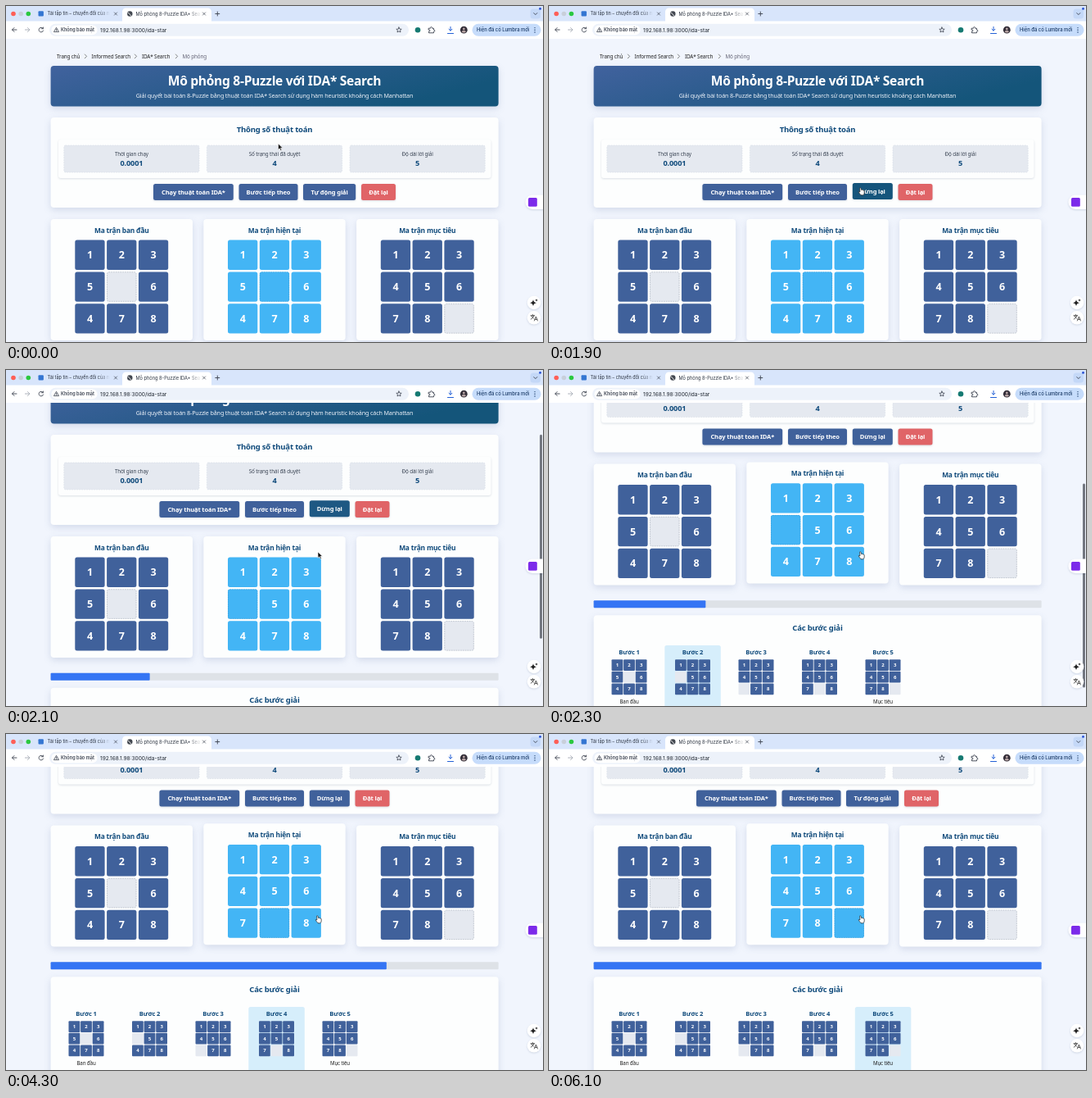
Recreate the animation shown at these times as an HTML page. Size 656 by 410 pixels, loop 6.3 s.

```html
<!DOCTYPE html>
<html lang="vi">
<head>
<meta charset="utf-8">
<title>8-Puzzle IDA*</title>
<style>
  html, body { margin: 0; width: 100%; height: 100%; overflow: hidden; background: #f1f5fd; }
  svg { display: block; width: 100vw; height: 100vh; }
  text { font-family: "Noto Sans", "Open Sans", sans-serif; letter-spacing: -.02em; white-space: pre; }
  .ui text { font-family: Inter, Roboto, sans-serif; letter-spacing: 0; }
  .card { filter: drop-shadow(0 3px 4.5px rgb(40 70 130 / .15)); }
  .soft { filter: drop-shadow(0 1px 1px rgb(40 60 100 / .16)); }
  .line { fill: none; stroke-linecap: round; stroke-linejoin: round; }
</style>
</head>
<body>
<svg id="stage" viewBox="0 0 656 410" preserveAspectRatio="none"></svg>
<script>
const LOOP = 6300, FRAME = 100;
const NAVY = '#40619b', DARK = '#15557c', SKY = '#43b5f5', HEAD = '#0f4a7b', PALE = '#e5e9f0';
const MOVES = [1920, 2930, 3930, 4930];
const START = 900, FINISH = 6000;
const BOARDS = ['1235 6478', '123 56478', '123456 78', '1234567 8', '12345678 '];
const SCROLL = [[1900, 0], [2000, 14], [2100, 57], [2200, 113], [2300, 145.5],
                [2400, 147.6], [2500, 148.2], [2700, 148.5]];

// Markup helpers; text is centred vertically on y.
const rect = (x, y, w, h, fill, r = 0, extra = '') =>
  `<rect x="${x}" y="${y}" width="${w}" height="${h}" rx="${r}" fill="${fill}" ${extra}/>`;
const circle = (x, y, r, fill, extra = '') =>
  `<circle cx="${x}" cy="${y}" r="${r}" fill="${fill}" ${extra}/>`;
const line = (d, color, width = .9, extra = '') =>
  `<path class="line" d="${d}" stroke="${color}" stroke-width="${width}" ${extra}/>`;
const text = (x, y, s, size, fill, weight = 400, anchor = 'middle') =>
  `<text x="${x}" y="${y}" dy=".36em" font-size="${size}" fill="${fill}" font-weight="${weight}" text-anchor="${anchor}">${s}</text>`;
const left = (x, y, s, size, fill, weight) => text(x, y, s, size, fill, weight, 'start');
const card = (x, y, w, h) => rect(x, y, w, h, '#fdfefe', 4, 'class="card"');

function dashed(x, y, size, color) {
  return rect(x + .4, y + .4, size - .8, size - .8, 'none', 2,
    `stroke="${color}" stroke-width=".8" stroke-dasharray="1.6 1.2"`);
}

function grid(x0, y0, board, tile, pitch, size, radius) {
  return [...board].map((n, i) => {
    const x = x0 + i % 3 * pitch, y = y0 + Math.floor(i / 3) * pitch;
    const box = rect(x, y, tile, tile, n === ' ' ? PALE : NAVY, radius);
    if (n !== ' ') return box + text(x + tile / 2, y + tile / 2, n, size, '#fff', 700);
    return box + (tile > 20 ? dashed(x, y, tile, '#b9bfc8') : '');
  }).join('');
}

function currentGrid(x0, y0) {
  return Array.from({ length: 9 }, (_, i) => {
    const x = x0 + i % 3 * 38.8, y = y0 + Math.floor(i / 3) * 38.8;
    return rect(x, y, 36.3, 36.3, SKY, 2.5) +
      `<g class="gap">${dashed(x, y, 36.3, '#3594cf')}</g>` +
      `<g class="digit">${text(x + 18.15, y + 18.15, '', 12.5, '#fff', 700)}</g>`;
  }).join('');
}

function matrix(cx, title, content) {
  return card(cx - 86.7, 260, 173.4, 148) + text(cx, 273.8, title, 8.4, HEAD, 700) + content;
}

function pageMarkup() {
  const chevrons = [97.5, 158.5, 208.5].map(x => line(`M${x - 1.2} 59l2.3 2.4l-2.3 2.4`, '#555', .7));
  const stats = [['Thời gian chạy', '0.0001'], ['Số trạng thái đã duyệt', '4'], ['Độ dài lời giải', '5']]
    .map(([label, value], i) => {
      const x = 70.8 + i * 174.6;
      return rect(x, 170, 165.2, 33, PALE, 2) +
        rect(x, 170, 165.2, 33, 'none', 2, 'stroke="#d3dae4" stroke-width=".6" stroke-dasharray="1.5 1.5"') +
        text(x + 82.6, 181, label, 6.3, '#3c4655') + text(x + 82.6, 192, value, 9.2, HEAD, 700);
    });
  const buttons = ['Chạy thuật toán IDA*', 'Bước tiếp theo', '', 'Đặt lại'].map((label, i) =>
    `<g class="button">${rect(0, 217, 10, 20, i === 3 ? '#e06467' : NAVY, 2.5, 'class="soft"')}${text(0, 227, label, 7.55, '#fff', 700)}</g>`);
  const steps = BOARDS.map((board, i) => {
    const cx = 98 + i * 77.5, note = { 0: 'Ban đầu', 4: 'Mục tiêu' }[i] || '';
    return rect(cx - 34.2, 481.5, 68.5, 80, '#d6eefb', 2.5, 'class="step"') +
      text(cx, 490, `Bước ${i + 1}`, 7.6, HEAD, 700) +
      grid(cx - 21.5, 498.7, board, 13.8, 14.6, 6, 1) +
      text(cx, 550.5, note, 6.2, '#222');
  });
  return `<g id="page">
    ${left(62, 61.3, 'Trang chủ', 6.3, '#222')}${left(104.5, 61.3, 'Informed Search', 6.3, '#222')}
    ${left(166, 61.3, 'IDA* Search', 6.3, '#222')}${left(215.5, 61.3, 'Mô phỏng', 6.3, '#667')}${chevrons.join('')}
    ${rect(54.6, 73, 547, 49.6, 'url(#hero)', 4, 'class="card"')}
    ${text(328, 91.5, 'Mô phỏng 8-Puzzle với IDA* Search', 15.6, '#fff', 700)}
    ${text(328, 109, 'Giải quyết bài toán 8-Puzzle bằng thuật toán IDA* Search sử dụng hàm heuristic khoảng cách Manhattan', 7.18, '#eef3fa')}
    ${card(54.6, 136, 547, 110)}${text(328, 151, 'Thông số thuật toán', 9.5, HEAD, 700)}
    ${rect(64, 163, 528.5, 47, '#fdfefe', 3, 'class="soft"')}${stats.join('')}${buttons.join('')}
    ${matrix(141.3, 'Ma trận ban đầu', grid(84.3, 285.6, BOARDS[0], 36.3, 38.8, 12.5, 2.5))}
    <g id="current">${matrix(328, 'Ma trận hiện tại', currentGrid(271, 285.6))}</g>
    ${matrix(514.8, 'Ma trận mục tiêu', grid(457.8, 285.6, BOARDS[4], 36.3, 38.8, 12.5, 2.5))}
    ${rect(54.6, 426.8, 547, 9, '#dee2e7', 1)}${rect(54.6, 426.8, 0, 9, '#3575f4', 1, 'id="bar"')}
    ${card(54.6, 444.7, 547, 128)}${text(328, 459.6, 'Các bước giải', 9.5, HEAD, 700)}${steps.join('')}
  </g>`;
}

function browserMarkup() {
  const ink = '#3b4250';
  const cross = x => line(`M${x - 1.6} 7.9l3.2 3.2m0-3.2l-3.2 3.2`, ink, .7);
  return `<g class="ui">
    ${rect(0, 0, 656, 19, '#d8e5fb')}${rect(142, 2.5, 109, 22, '#fff', 4.5)}${rect(0, 18.5, 656, 21.5, '#fff')}
    ${circle(9, 9.5, 2.8, '#fe5f57')}${circle(18.2, 9.5, 2.8, '#c8cfda')}${circle(27.3, 9.5, 2.8, '#2bc840')}
    ${rect(39.5, 6.2, 6.4, 6.4, '#3476d2', 1)}${left(50.5, 9.5, 'Tải tập tin – chuyển đổi của n', 5.5, 'url(#fade)')}${cross(134)}
    ${circle(151.3, 9.5, 3.2, '#41464f')}${line('M149 8.3q2 .3 2 1.6t1.7 1.6', '#fff', .8)}
    ${left(158.5, 9.5, 'Mô phỏng 8-Puzzle IDA* Sea', 5.65, 'url(#fade)')}${cross(242)}
    ${line('M255.8 9.5h5M258.3 7v5', ink)}
    ${rect(640.5, 3.5, 12.5, 12, '#c4d8f7', 3.5)}${line('M644.8 8.6l2 2l2-2', ink)}${circle(652.5, 3.2, 1.5, '#3157d5')}
    ${line('M13 29h-5.4m2.4-2.5l-2.5 2.5l2.5 2.5', ink)}${line('M23.4 29h5.4m-2.4-2.5l2.5 2.5l-2.5 2.5', '#a5abb5')}
    ${line('M45.2 27.4a2.8 2.8 0 1 0 .4 2.6m-.2-4v1.7h-1.8', ink)}
    ${rect(53, 21.8, 439, 15, '#edf2fa', 7.5)}${rect(55.5, 23.4, 56, 11.8, '#fff', 5.9)}
    ${line('M61.7 26.6l2.9 5h-5.8zM61.7 28.4v1.2m0 .9v.1', ink, .8)}
    ${left(67, 29.3, 'Không bảo mật', 5.6, ink, 600)}${left(115, 29.3, '192.168.1.98:3000/ida-star', 6.55, '#1f2630')}
    ${line('M480 26l.9 2.1l2.3.2l-1.7 1.5l.5 2.2l-2-1.2l-2 1.2l.5-2.2l-1.7-1.5l2.3-.2z', ink, .8)}
    ${circle(503, 29.3, 3.3, '#167a72')}
    ${line('M516.5 27.2h2v-.6a1 1 0 0 1 2 0v.6h2v2h.3a1 1 0 0 1 0 2h-.3v1.6h-6v-1.8h.5a.9.9 0 0 0 0-1.9h-.5z', ink, .9)}
    ${line('M543 25.4v4.6m-2-1.8l2 2l2-2', '#2461d6', 1)}${line('M539.5 33.5h7', '#2461d6', 1.1)}
    ${circle(559.3, 29.2, 4.4, '#332e38')}${circle(559.3, 28, 1.4, '#b7a4a4')}${rect(557, 30, 4.6, 2.6, '#b7a4a4', 1.3)}
    ${rect(569.5, 21.8, 84, 15, '#c6dcfb', 7.5)}${left(575, 29.3, 'Hiện đã có Lumbra mới', 5.85, '#173764', 500)}
    ${[26.6, 29.3, 32].map(y => circle(646, y, .7, '#173764')).join('')}
  </g>`;
}

function overlayMarkup() {
  return `${rect(652, 40.5, 3, 249, '#737780', 1.5, 'id="thumb"')}
    ${rect(634.5, 230.5, 30, 17.5, '#fff', 8.5, 'class="soft"')}${rect(638, 234, 10.8, 10.8, '#7c2bea', 1.5)}
    ${circle(645, 362, 8.3, '#fff', 'class="soft"')}${circle(645, 380.3, 8.3, '#fff', 'class="soft"')}
    <path d="M644 358.2q.5 3.5 4 4q-3.5.5-4 4q-.5-3.5-4-4q3.5-.5 4-4zM648 357.2q.2 1.6 1.8 1.8q-1.6.2-1.8 1.8q-.2-1.6-1.8-1.8q1.6-.2 1.8-1.8z" fill="#222"/>
    ${line('M641 377.8h4.8m-2.4-1.2v1.2m1.6 0q-.8 3-3.8 4.4m.6-4.2q.8 2 2.6 3.2m1 2.8l2-5l2 5m-3.3-1.6h2.6', '#333', .8)}
    <g id="cursor">
      <path id="arrow" d="M0 0v7.4l1.8-1.6l1.2 2.8l1.3-.6l-1.2-2.7h2.4z" fill="#111" stroke="#fff" stroke-width=".6"/>
      <path id="hand" d="M-1.3 0q.9-.7 1.3.3l.7 2.4q.7-.6 1.3.1q.8-.4 1.2.3q1-.1 1 .9v2q0 2.2-1.4 2.8h-2.8q-.8-1.2-1.8-2.4q-1.1-1-.9-1.8q.7-.6 1.6.5z" fill="#fff" stroke="#222" stroke-width=".7"/>
    </g>`;
}

const stage = document.getElementById('stage');
stage.innerHTML = `<defs>
    <linearGradient id="hero" x1="0" y1="0" x2="1" y2=".35"><stop stop-color="#41629e"/><stop offset="1" stop-color="#14557a"/></linearGradient>
    <linearGradient id="fade"><stop offset=".82" stop-color="#2a323f"/><stop offset="1" stop-color="#2a323f" stop-opacity=".1"/></linearGradient>
  </defs>` + rect(0, 0, 656, 410, '#f1f5fd') + pageMarkup() + browserMarkup() + overlayMarkup();

const $ = id => document.getElementById(id);
const all = selector => [...stage.querySelectorAll(selector)];
const buttons = all('.button'), digits = all('.digit text'), gaps = all('.gap'), steps = all('.step');
const shift = (el, x, y) => el.setAttribute('transform', `translate(${x} ${y})`);
const clamp = p => Math.min(1, Math.max(0, p));

// The CSS "ease" curve, cubic-bezier(.25, .1, .25, 1).
function ease(p) {
  let low = 0, high = 1;
  for (let i = 0; i < 20; i++) {
    const s = (low + high) / 2;
    if (.75 * s - .75 * s * s + s ** 3 < p) low = s; else high = s;
  }
  return .3 * low * (1 - low) ** 2 + 3 * low * low * (1 - low) + low ** 3;
}
const transition = (t, from) => t <= from ? 0 : ease(clamp((t - from) / 300));

function keyed(t, keys) {
  const next = keys.findIndex(([time]) => time > t);
  if (next === 0) return keys[0][1];
  if (next < 0) return keys.at(-1)[1];
  const [t0, a] = keys[next - 1], [t1, b] = keys[next];
  return a + (b - a) * (t - t0) / (t1 - t0);
}

function drawButtons(t) {
  const running = t >= START && t < FINISH;
  const spans = running
    ? [[187.4, 97.8], [292, 72], [370.8, 49], [426.5, 42]]
    : [[180, 97.8], [284.5, 72], [363, 64.2], [434, 42]];
  const hover = transition(t, 450) - transition(t, 2050);
  buttons.forEach((button, i) => {
    const [x, width] = spans[i], [box, label] = button.children;
    box.setAttribute('width', width);
    label.setAttribute('x', width / 2);
    shift(button, x, i === 2 ? -.9 * hover : 0);
  });
  const [box, label] = buttons[2].children;
  box.style.fill = `color-mix(in srgb, ${DARK} ${hover * 100}%, ${NAVY})`;
  label.textContent = running ? 'Dừng lại' : 'Tự động giải';
}

function draw(t) {
  const scroll = keyed(t, SCROLL);
  shift($('page'), 0, -scroll);
  shift($('current'), 0, -2.2 * transition(t, 2120));
  $('thumb').setAttribute('y', 40.5 + scroll * .673);
  $('thumb').style.opacity = t < 2000 ? 0 : 1 - clamp((t - 2900) / 300);
  drawButtons(t);

  const board = BOARDS[MOVES.filter(time => time <= t).length];
  [...board].forEach((n, i) => {
    digits[i].textContent = n.trim();
    gaps[i].style.opacity = n === ' ' ? .6 : 0;
  });
  const done = MOVES.map(time => transition(t, time));
  $('bar').setAttribute('width', 547 * done.reduce((a, b) => a + b) / 4);
  steps.forEach((step, i) => step.style.opacity = (i ? done[i - 1] : 1) - (done[i] || 0));

  const move = ease(clamp(t / 600));
  const pointing = t >= 400 && (t < 2000 || t >= 2200);
  shift($('cursor'), 332.5 + 48.5 * move, 168 + 54 * move);
  $('arrow').style.display = pointing ? 'none' : '';
  $('hand').style.display = pointing ? '' : 'none';
}

const start = performance.now();
function tick() {
  const t = (performance.now() - start) % LOOP;
  draw(Math.floor(t / FRAME) * FRAME);
  requestAnimationFrame(tick);
}
tick();
</script>
</body>
</html>
```
